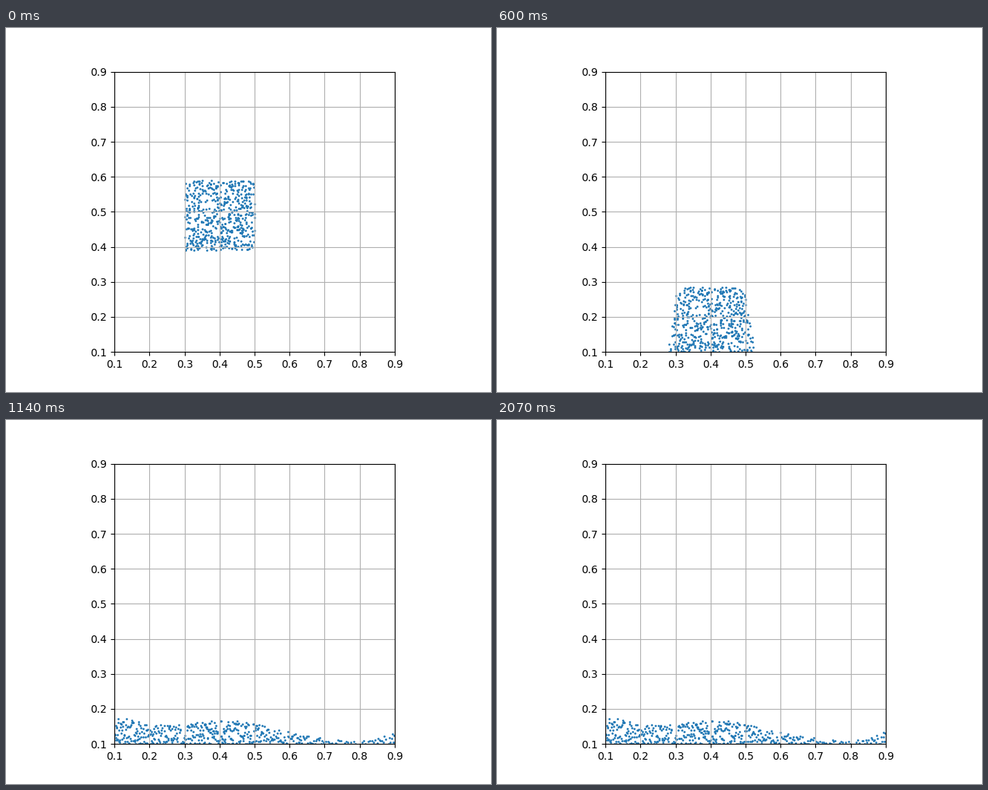
Animation of 640 by 480 pixels, one loop 2.1 s. Source, as a matplotlib script:

```python
import numpy as np
import matplotlib.pyplot as plt
from matplotlib.animation import FuncAnimation

FRAMES, INTERVAL = 70, 30
N = 560
FLOOR, LEFT, RIGHT = 0.094, 0.095, 0.905
LANDING = 18

rng = np.random.default_rng(7)
u, w = rng.random((2, N))  # place inside the block: across, up

# Low and outer grains run out furthest; each keeps its rank across the heap
# and its share of the local height, so the density stays even.
TAPER = 0.5
side = (u - 0.5) * (1 - TAPER * w)
rank = (np.argsort(np.argsort(side)) + 0.5) / N
w_max = np.minimum(1, (1 - 2 * np.abs(side)) / TAPER)
share = np.log(1 - TAPER * w) / np.log(1 - TAPER * w_max)


def block(k):
    drop = 0.000222 * k + 0.000778 * k * k
    return np.column_stack([0.3 + 0.2 * u, 0.39 + 0.2 * w - drop])


def impact():
    spread = np.where(u < 0.5, 0.025, 0.03) * (1 - w) ** 1.2
    x = 0.3 + 0.2 * u + (2 * u - 1) * spread
    y = 0.09 + 0.196 * w - 0.02 * w * np.abs(2 * u - 1) ** 6
    return np.column_stack([x, y])


def heap(tops):
    """Fill a heap whose surface is given in thousandths above 0.1."""
    xs = np.linspace(LEFT, RIGHT, 600)
    knots = np.linspace(0.1, 0.9, len(tops))
    depth = np.interp(xs, knots, 0.1 + np.array(tops) / 1000) - FLOOR
    mass = np.cumsum(np.maximum(depth, 1e-6))
    x = np.interp(rank, mass / mass[-1], xs)
    return np.column_stack([x, FLOOR + share * np.interp(x, xs, depth)])


def creep(pos, amount):
    """Let the right flank slide slowly towards the wall."""
    x, y = pos.T
    s = np.clip((x - 0.45) / 0.45, 0, 1)
    stretch = 1 + amount * (2 * s - 3 * s * s) / 0.45
    x = x + amount * s * s * (1 - s)
    return np.column_stack([x, FLOOR + (y - FLOOR) / stretch])


slump = heap([3, 14, 35, 62, 93, 115, 124, 120, 96, 62, 33, 12, -1, -6, -6, -6, -6])
runout = heap([58, 55, 48, 57, 68, 75, 87, 88, 75, 60, 38, 25, 15, 7, 1, 0, -5])
rest = heap([76, 72, 57, 54, 55, 65, 69, 66, 60, 44, 35, 24, 16, 12, 9, 15, 30])

times = np.array([LANDING, 20, 25, 30, 36, 54, 69])
poses = np.array([block(LANDING), impact(), slump, runout, rest,
                  creep(rest, 0.08), creep(rest, 0.083)])

# Monotone cubic slopes, so no grain overshoots.
slope = np.diff(poses, axis=0) / np.diff(times)[:, None, None]
a, b = slope[:-1], slope[1:]
same = a * b > 0
inner = np.where(same, 2 * a * b / np.where(same, a + b, 1), 0)
tangent = np.concatenate([slope[:1], inner, np.zeros_like(slope[:1])])


def position(k):
    if k <= LANDING:
        return block(k)
    i = min(np.searchsorted(times, k, side="right") - 1, len(times) - 2)
    span = times[i + 1] - times[i]
    t = (k - times[i]) / span
    return ((1 + 2 * t) * (1 - t) ** 2 * poses[i]
            + t * (1 - t) ** 2 * span * tangent[i]
            + t * t * (3 - 2 * t) * poses[i + 1]
            + t * t * (t - 1) * span * tangent[i + 1])


fig, ax = plt.subplots(figsize=(6.4, 4.8), dpi=100)
ax.set_aspect("equal")
ax.set(xlim=(0.1, 0.9), ylim=(0.1, 0.9))
ticks = np.arange(1, 10) / 10
ax.set_xticks(ticks)
ax.set_yticks(ticks)
ax.grid(True)
grains = ax.scatter(*position(0).T, s=1, color="C0")


def update(k):
    grains.set_offsets(position(k))
    return (grains,)


anim = FuncAnimation(fig, update, frames=FRAMES, interval=INTERVAL,
                     repeat=True, repeat_delay=0)
plt.show()
```
